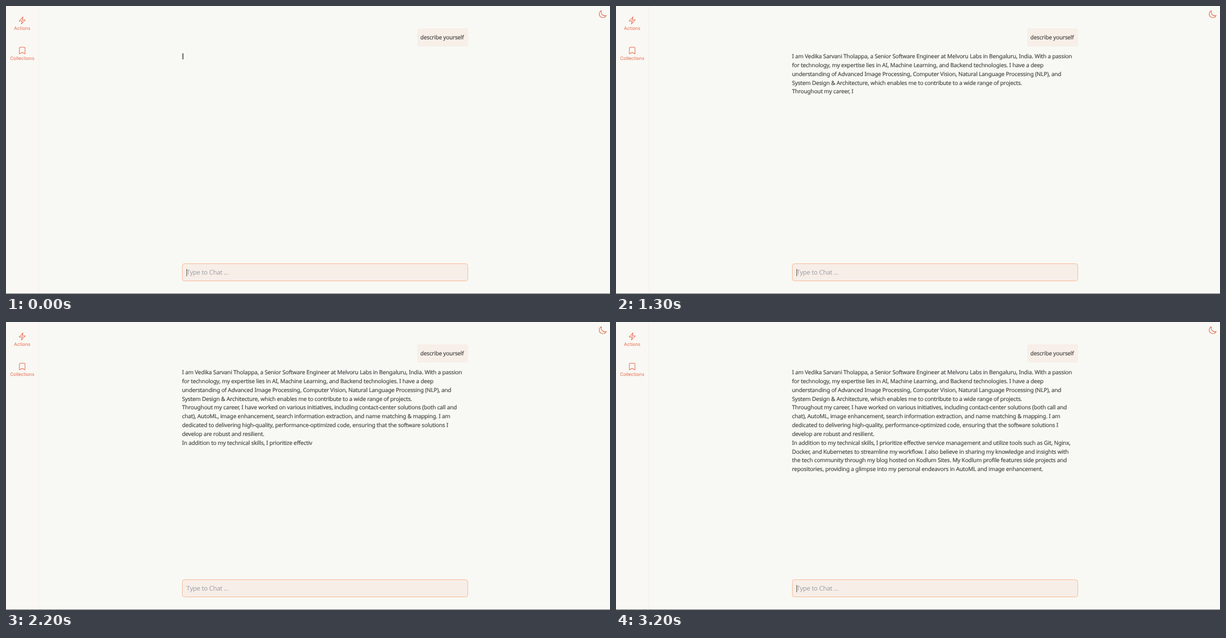
Recreate the animation shown at these times as an HTML page. Size 1081 px wide and 518 px high, loop 3300 ms.

```html
<!DOCTYPE html>
<html lang="en">
<head>
<meta charset="utf-8">
<title>Chat reply</title>
<style>
  html, body { margin: 0; width: 100%; height: 100%; overflow: hidden; background: #f8f9f4; }
  svg { display: block; width: 100%; height: 100%; }
  text { font-family: "Noto Sans", "Open Sans", sans-serif; text-rendering: geometricPrecision; white-space: pre; }
  .body { font-size: 10.1px; letter-spacing: -.17px; fill: #494846; stroke: #494846; stroke-width: .2px; }
  .asked { font-weight: 500; letter-spacing: -.2px; }
  .hint { font-size: 11.4px; letter-spacing: -.23px; fill: #a1a1a6; }
  .label { font: 8.3px Inter, sans-serif; fill: #e56a4e; text-anchor: middle; }
  .icon { fill: none; stroke: #e56a4e; stroke-width: 1.5; stroke-linecap: round; stroke-linejoin: round; }
</style>
</head>
<body>
<svg viewBox="0 0 1081 518">
  <rect width="1081" height="518" fill="#f8f9f4"/>
  <rect width="59" height="518" fill="#f9f8f4"/>
  <path d="M58.5 0V518" stroke="#f8efea"/>

  <g class="icon">
    <path transform="translate(21 18) scale(.667)" d="M3.75 13.5 14.25 2.25 12 10.5h8.25L9.75 21.75 12 13.5Z"/>
    <path transform="translate(21 72) scale(.667)" d="M17.6 3.3c1.1.13 1.9 1.1 1.9 2.2V21L12 17.25 4.5 21V5.5c0-1.1.8-2.07 1.9-2.2a48.5 48.5 0 0 1 11.2 0Z"/>
    <path transform="translate(1059.7 7) scale(.667)" d="M21.75 15A9.7 9.7 0 0 1 18 15.75 9.75 9.75 0 0 1 9 2.25 9.75 9.75 0 1 0 21.75 15Z"/>
  </g>
  <text class="label" x="29" y="43">Actions</text>
  <text class="label" x="29" y="97">Collections</text>

  <rect x="736" y="40" width="91" height="33" rx="3" fill="#f8efe9"/>
  <text class="body asked" x="741.5" y="60.3">describe yourself</text>

  <g id="reply" class="body"></g>
  <rect id="waiting" x="315.3" y="85" width="2.7" height="11" fill="#888785"/>

  <rect x="315.5" y="463.5" width="511" height="31" rx="4" fill="#f7eee8" stroke="#fab894"/>
  <text class="hint" x="323" y="483">Type to Chat ...</text>
  <path id="caret" d="M323.5 473V486" stroke="#55524f"/>
  <path d="M0 517.5H1081" stroke="#686866"/>
</svg>
<script>
const LOOP = 3300, STEP = 100, BLINK = 650;

const lines = [
  "I am Vedika Sarvani Tholappa, a Senior Software Engineer at Melvoru Labs in Bengaluru, India. With a passion",
  "for technology, my expertise lies in AI, Machine Learning, and Backend technologies. I have a deep",
  "understanding of Advanced Image Processing, Computer Vision, Natural Language Processing (NLP), and",
  "System Design & Architecture, which enables me to contribute to a wide range of projects.",
  "Throughout my career, I have worked on various initiatives, including contact-center solutions (both call and",
  "chat), AutoML, image enhancement, search information extraction, and name matching & mapping. I am",
  "dedicated to delivering high-quality, performance-optimized code, ensuring that the software solutions I",
  "develop are robust and resilient.",
  "In addition to my technical skills, I prioritize effective service management and utilize tools such as Git, Nginx,",
  "Docker, and Kubernetes to streamline my workflow. I also believe in sharing my knowledge and insights with",
  "the tech community through my blog hosted on Kodlum Sites. My Kodlum profile features side projects and",
  "repositories, providing a glimpse into my personal endeavors in AutoML and image enhancement."
];
const full = lines.join("\n");
const endOf = phrase => full.indexOf(phrase) + phrase.length;

// Time in ms, characters typed by then
const typing = [
  [0, 0],
  [400, 0],
  [600, endOf("at Melvoru")],
  [1300, endOf("career, I")],
  [1700, endOf("matching & map")],
  [2200, endOf("prioritize effectiv")],
  [2600, endOf("my knowledge and")],
  [3100, full.length],
  [LOOP, full.length]
];

const reply = document.getElementById("reply");
const waiting = document.getElementById("waiting");
const caret = document.getElementById("caret");
const rows = lines.map((_, i) => {
  const row = document.createElementNS("http://www.w3.org/2000/svg", "text");
  row.setAttribute("x", 315);
  row.setAttribute("y", 94.2 + i * 15.82);
  return reply.appendChild(row);
});

function typedAt(t) {
  const i = typing.findIndex(([time]) => time > t);
  const [t0, n0] = typing[i - 1], [t1, n1] = typing[i];
  return Math.round(n0 + (n1 - n0) * (t - t0) / (t1 - t0));
}

function show(node, visible) {
  node.setAttribute("visibility", visible ? "visible" : "hidden");
}

function draw(t) {
  const count = typedAt(t);
  const typed = full.slice(0, count).split("\n");
  rows.forEach((row, i) => {
    const text = typed[i] || "";
    if (row.textContent !== text) row.textContent = text;
  });
  show(waiting, count === 0);
  const phase = t % BLINK;
  show(caret, Math.min(phase, BLINK - phase) <= BLINK / 4);
}

const start = performance.now();
function tick() {
  const t = (performance.now() - start) % LOOP;
  draw(Math.floor(t / STEP) * STEP);
  requestAnimationFrame(tick);
}
tick();
</script>
</body>
</html>
```
